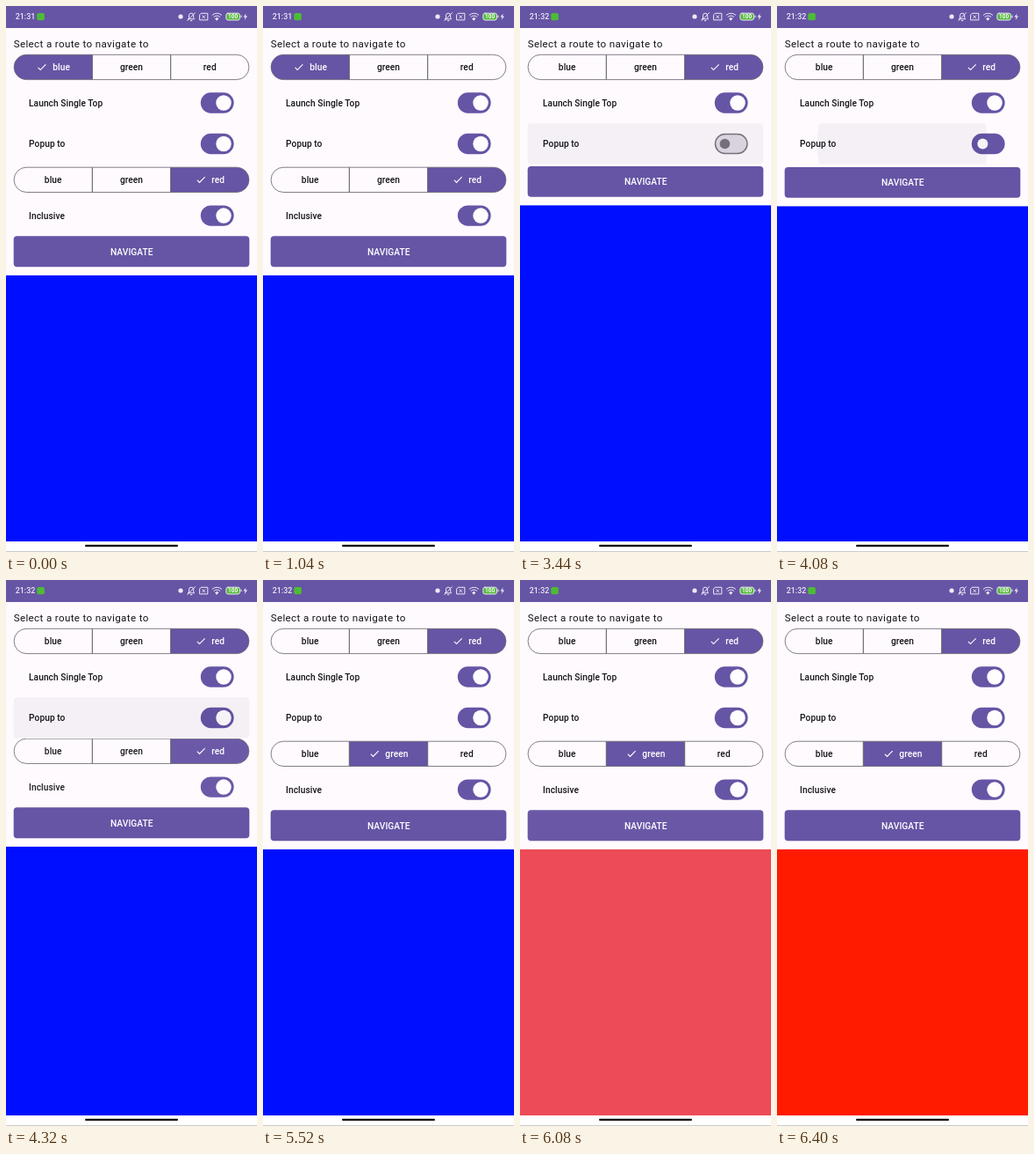
An HTML page that plays this animation: 286x620 px, repeating every 6480 ms.

```html
<!DOCTYPE html>
<html lang="en">
<head>
<meta charset="utf-8">
<title>Route picker</title>
<style>
html, body { margin: 0; width: 100%; height: 100%; overflow: hidden; background: #fefafe; }
svg { display: block; }
text { font-family: Roboto, sans-serif; }
.label { font-size: 10.19px; font-weight: 500; letter-spacing: .073px; }
</style>
</head>
<body>
<svg id="stage" width="286" height="620" viewBox="0 0 286 620"></svg>
<script>
const LOOP = 6480, STEP = 80;
const PURPLE = '#6654a5', PAPER = '#fefafe', INK = '#161518', OUTLINE = '#79747e', LIGHT = '#eeeaf5';
const LEFT = 8.7, WIDTH = 268.6;
const SEG_LEFT = 9.1, SEG = 89.27, SEG_H = 28.3;
const SECTION_TOP = 179.9, SECTION_H = 81.45;
const ROUTES = [['blue', 20], ['green', 26], ['red', 14.5]];

// Moments when each tap is released, in ms; the finger goes down PRESS earlier
const PICK_ROUTE = 2125, CLOSE = 3160, OPEN = 4065, PICK_POPUP = 5085, NAVIGATE = 5787;
const PRESS = 70;

const clamp = x => Math.min(1, Math.max(0, x));
const mix = (a, b, k) => a + (b - a) * k;

// cubic-bezier(.4, 0, .2, 1)
function ease(x) {
  x = clamp(x);
  let lo = 0, hi = 1;
  for (let i = 0; i < 20; i++) {
    const u = (lo + hi) / 2, v = 1 - u;
    if (1.2 * v * v * u + .6 * v * u * u + u * u * u < x) lo = u; else hi = u;
  }
  return lo * lo * (3 - 2 * lo);
}

// Critically damped spring from 0 to 1
function spring(ms) {
  const x = Math.max(0, ms) * .02;
  return 1 - (1 + x) * Math.exp(-x);
}

const label = (x, y, s, fill = INK, anchor = 'start') =>
  `<text class="label" x="${x}" y="${y}" fill="${fill}" text-anchor="${anchor}">${s}</text>`;

const box = (x, y, w, h, l, r) =>
  `M${x + l} ${y}H${x + w - r}a${r} ${r} 0 0 1 ${r} ${r}V${y + h - r}a${r} ${r} 0 0 1 ${-r} ${r}` +
  `H${x + l}a${l} ${l} 0 0 1 ${-l} ${-l}V${y + l}a${l} ${l} 0 0 1 ${l} ${-l}z`;

function ripple(id, sinceRelease, shape, cx, cy, reach, fill, alpha) {
  const ms = sinceRelease + PRESS;
  if (ms <= 0 || ms >= 490) return '';
  const a = alpha * clamp(ms / 75) * clamp((490 - ms) / 130);
  const r = reach * mix(.3, 1, ease(ms / 225));
  return `<clipPath id="${id}"><path d="${shape}"/></clipPath>
    <circle clip-path="url(#${id})" cx="${cx}" cy="${cy}" r="${r}" fill="${fill}" opacity="${a}"/>`;
}

function segments(id, t, y, from, to, start) {
  const k = ease((t - start) / 350), selected = t < start ? from : to;
  let fills = '', lines = '', content = '';
  ROUTES.forEach(([name, w], i) => {
    const x = SEG_LEFT + i * SEG, c = x + SEG / 2, on = i === selected;
    const shape = box(x, y, SEG, SEG_H, i === 0 ? SEG_H / 2 : 0, i === 2 ? SEG_H / 2 : 0);
    const shift = i === to ? k : i === from ? 1 - k : 0;
    const color = on ? '#fff' : INK;
    fills += `<path d="${shape}" fill="${on ? PURPLE : PAPER}"/>`;
    if (i === to) fills += ripple(id, t - start, shape, c, y + 14, 48, color, .1);
    lines += `<path d="${shape}" fill="none" stroke="#6d6872" stroke-width=".85"/>`;
    content += label(c + 9.46 * shift, y + 17.8, name, color, 'middle');
    if (on) {
      const s = i === to ? k : 1;
      content += `<path transform="translate(${c - (18.9 + w) / 2} ${y + 20.7}) scale(${.546 * s}) translate(0 -24)"
        opacity="${s}" fill="#fff" d="M9 16.17 4.83 12l-1.42 1.41L9 19 21 7l-1.41-1.41z"/>`;
    }
  });
  return fills + lines + content;
}

function toggleRow(cy, name, k = 1, on = true) {
  const track = on
    ? `<rect x="221.8" y="${cy - 11.65}" width="37.8" height="23.3" rx="11.65" fill="${PURPLE}"/>`
    : `<rect x="222.5" y="${cy - 10.9}" width="36.4" height="21.8" rx="10.9" fill="#e2dce6" stroke="${OUTLINE}" stroke-width="1.46"/>`;
  return label(26, cy + 3.7, name) + track +
    `<circle cx="${mix(233.4, 248, k)}" cy="${cy}" r="${mix(5.8, 8.73, k)}" fill="${on ? '#fffdff' : OUTLINE}"/>`;
}

function statusBar(t) {
  return `<rect width="286" height="25" fill="${PURPLE}"/>
    <text x="10.7" y="15.4" font-size="8.9" font-weight="500" fill="${LIGHT}">${t < 3120 ? '21:31' : '21:32'}</text>
    <rect x="35.3" y="8" width="8.6" height="8.2" rx="2" fill="#4dbb36"/>
    <circle cx="199" cy="12" r="2.6" fill="${LIGHT}"/>
    <g fill="none" stroke="${LIGHT}" stroke-width="1" stroke-linecap="round" stroke-linejoin="round">
      <path d="M207.5 14.8h7.2l-1-1.4v-2.6a2.6 2.6 0 0 0-5.2 0v2.6zM210.3 16.7h1.6M215.6 7.6l-8.8 9"/>
      <path d="M222.6 8.3h7.2v7.6h-9.2v-5.4zM223.9 10.9l2.8 2.8m0-2.8l-2.8 2.8"/>
      <path d="M235.2 10.2a7.6 7.6 0 0 1 10.4 0M237 12.3a5 5 0 0 1 6.8 0"/>
      <path d="M238.9 14.2a2.4 2.4 0 0 1 3 0l-1.5 1.8z" fill="${LIGHT}"/>
      <rect x="250.8" y="8.2" width="15.6" height="7.8" rx="2.2" fill="#55b83e"/>
      <path d="M268 11v2"/>
    </g>
    <text x="258.6" y="14.4" font-size="6.4" font-weight="700" fill="#fff" text-anchor="middle">100</text>
    <path d="M273.6 8.4l-3.2 4.2h2.2l-.9 3.4 3.4-4.4h-2.2z" fill="${LIGHT}"/>`;
}

// Red fades in over blue fading out on the paper; channels may overshoot and are clipped by rgb()
function destination(t) {
  const p = ease((t - NAVIGATE) / 700), q = 1 - p;
  const blue = [-3, 14, 266], paper = [254, 250, 254], red = [277, 25, -4];
  return `rgb(${red.map((c, i) => Math.round(p * c + q * (q * blue[i] + p * paper[i])))})`;
}

function draw(t) {
  const reopened = t >= OPEN, popup = t < CLOSE || reopened;
  const shown = reopened ? spring(t - OPEN) : 1 - spring(t - CLOSE);
  const knob = reopened ? ease((t - OPEN) / 100) : 1 - ease((t - CLOSE) / 100);
  const h = SECTION_H * shown, nav = SECTION_TOP + h, screen = nav + 44.5;
  const row = box(LEFT, 133.3, WIDTH, 46.3, 4, 4);
  const button = box(LEFT, nav, WIDTH, 34.9, 4, 4);
  const tap = t < OPEN - PRESS ? CLOSE : OPEN;

  return `<rect width="286" height="620" fill="${PAPER}"/>
    ${statusBar(t)}
    <text x="8.7" y="47" font-size="11.64" letter-spacing=".34" fill="${INK}">Select a route to navigate to</text>
    ${segments('routeTap', t, 55.3, 0, 2, PICK_ROUTE)}
    ${toggleRow(110, 'Launch Single Top')}
    ${toggleRow(156.5, 'Popup to', knob, popup)}
    ${ripple('rowTap', t - tap, row, 143, 156.5, 140, INK, .04)}
    <svg y="${SECTION_TOP}" width="286" height="${h}" overflow="hidden">
      <g transform="translate(0 ${h - SECTION_H - SECTION_TOP})" opacity="${shown}">
        ${segments('popupTap', t, 183.2, 2, 1, PICK_POPUP)}
        ${toggleRow(238.1, 'Inclusive')}
      </g>
    </svg>
    <path d="${button}" fill="${PURPLE}"/>
    ${ripple('navTap', t - NAVIGATE, button, 143, nav + 17, 140, '#fff', .025)}
    ${label(143.3, nav + 21.3, 'NAVIGATE', '#fff', 'middle')}
    <rect y="${screen}" width="286" height="${608 - screen}" fill="${destination(t)}"/>
    <rect y="608" width="286" height="12" fill="#fff"/>
    <rect x="90" y="611.8" width="106" height="2.2" rx="1.1" fill="#111"/>
    <rect y="619" width="286" height="1" fill="#ccc"/>`;
}

// The screen refreshes every STEP ms; the small lead absorbs start-up delay
const stage = document.getElementById('stage');
const begin = performance.now() - 8;
function tick() {
  const t = (performance.now() - begin) % LOOP;
  stage.innerHTML = draw(Math.floor(t / STEP) * STEP);
  requestAnimationFrame(tick);
}
tick();
</script>
</body>
</html>
```
